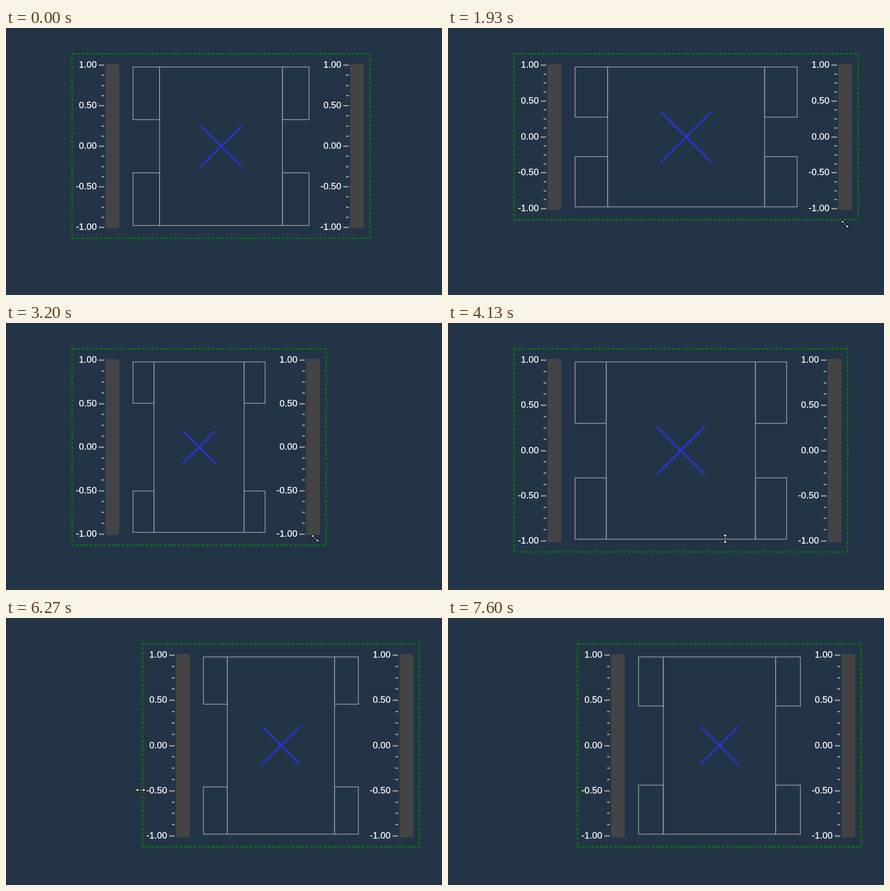
An HTML page with a canvas for the animation above (8.14 s loop, 954x586 px).

```html
<!DOCTYPE html>
<html lang="en">
<head>
<meta charset="utf-8">
<title>Resizing a drive widget</title>
<style>
  html, body { margin: 0; width: 100%; height: 100%; overflow: hidden; background: #243447; }
  canvas { display: block; }
</style>
</head>
<body>
<canvas id="stage" width="954" height="586"></canvas>
<script>
const ctx = document.getElementById('stage').getContext('2d', { alpha: false });
const LOOP = 8140, STEP = 1000 / 15, TOP = 55;

// Drags of the lower right corner and of the left edge: [step, x, y]
const corner = [
  [21, 828, 455], [26, 862, 395], [30, 908, 440], [33, 908, 523], [36, 635, 431],
  [41, 740, 310], [44, 890, 450], [46, 790, 557], [48, 702, 489], [54, 865, 385], [58, 876, 504]];
const side = [
  [81, 150, 304], [84, 430, 325], [89, 165, 360], [94, 297, 377],
  [99, 160, 370], [103, 450, 361], [106, 282, 359]];

// Smooth curve through the points, held at both ends
function along(keys, s) {
  const last = keys.length - 1;
  if (s >= keys[last][0]) return keys[last].slice(1);
  const i = keys.findIndex(k => k[0] > s) - 1;
  const a = keys[i], b = keys[i + 1], p = keys[Math.max(0, i - 1)], n = keys[Math.min(last, i + 2)];
  const d = b[0] - a[0], u = (s - a[0]) / d;
  return [1, 2].map(c => {
    const m0 = (b[c] - p[c]) / (b[0] - p[0]) * d, m1 = (n[c] - a[c]) / (n[0] - a[0]) * d;
    return a[c] * (1 + 2 * u) * (1 - u) ** 2 + m0 * u * (1 - u) ** 2
         + b[c] * u * u * (3 - 2 * u) - m1 * u * u * (1 - u);
  });
}

// Free pointer move that slows down; u runs from 0 to 1
function glide(u, from, to) {
  const e = u * (1.5 - u / 2);
  return from.map((v, i) => v + (to[i] - v) * e);
}

// The pointer runs slightly ahead of the edge it drags
function ahead(keys, s, dx, dy) {
  const a = along(keys, s), b = along(keys, s + 1), offset = [dx, dy];
  return a.map((v, i) => v + (b[i] - v) * 0.6 + offset[i]);
}

function boxAt(s) {
  if (s < 21) return [143, 798, 463];
  if (s < 81) return [143, ...along(corner, s).map(Math.round)];
  return [Math.round(along(side, s)[0]), 906, 504];
}

function pointerAt(s) {
  if (s < 2 || s >= 114) return null;
  if (s < 15) return ['arrow', ...glide((s - 2) / 12, [941, 578], [796, 460])];
  if (s < 21) return ['diagonal', 796, 458];
  if (s < 62) return ['diagonal', ...ahead(corner, s, -36, -3)];
  if (s < 81) {
    const u = Math.min(1, (s - 62) / 10);
    const kind = u === 0 ? 'vertical' : u < 1 ? 'arrow' : 'horizontal';
    return [kind, ...glide(u, [606, 473], [150, 303])];
  }
  if (s < 109) return ['horizontal', ...ahead(side, s, 7, 0)];
  return ['arrow', ...glide((s - 109) / 4, [280, 373], [118, 568])];
}

function drawFrame(l, r, b) {
  ctx.strokeStyle = '#008000';
  ctx.lineWidth = 3;
  ctx.setLineDash([6, 4.2]);
  ctx.strokeRect(l + 1.5, TOP + 1.5, r - l - 3, b - TOP - 3);
  ctx.setLineDash([]);
}

function drawGauge(x, b) {
  const first = TOP + 26.5, gap = (b - 25.5 - first) / 16;
  ctx.font = '20px "Liberation Sans", Arial, sans-serif';
  ctx.textAlign = 'right';
  ctx.strokeStyle = '#fff';
  ctx.lineWidth = 0.3;
  for (let i = 0; i <= 16; i++) {
    const y = Math.round(first + i * gap - 1.5), major = i % 4 === 0;
    ctx.fillStyle = '#969696';
    ctx.fillRect(x - (major ? 15 : 9), y, major ? 12 : 6, 3);
    if (!major) continue;
    const label = (1 - i / 8).toFixed(2);
    ctx.fillStyle = '#fff';
    ctx.fillText(label, x - 19.5, y + 7);
    ctx.strokeText(label, x - 19.5, y + 7);
  }
  ctx.fillStyle = '#444';
  ctx.beginPath();
  ctx.roundRect(x, TOP + 24, 30, b - TOP - 47, 4);
  ctx.fill();
}

function drawBase(l, r, b) {
  const x0 = l + 135, x1 = r - 135, y0 = TOP + 30.5, y1 = b - 29.5;
  const span = r - l - 207, w = 0.13 * span;
  const h = Math.min(0.26 * (span - 3), 0.3 * (y1 - y0 + 60));
  ctx.strokeStyle = '#a6a8ab';
  ctx.lineWidth = 1.5;
  ctx.strokeRect(x0 + w, y0, x1 - x0 - 2 * w, y1 - y0);
  for (const x of [x0, x1 - w])
    for (const y of [y0, y1 - h]) ctx.strokeRect(x, y, w, h);

  const cx = (x0 + x1) / 2, cy = (y0 + y1) / 2, k = span / 10;
  ctx.strokeStyle = '#3030ff';
  ctx.lineWidth = 3;
  ctx.beginPath();
  for (const d of [k, -k]) {
    ctx.moveTo(cx - k, cy - d);
    ctx.lineTo(cx + k, cy + d);
  }
  ctx.stroke();
}

const arrow = new Path2D('M0 0V16L4 12.5 6.5 18.5 9 17.5 6.5 11.5H11.5Z');
const doubleArrow = new Path2D('M-5.5-1V-4.5L-10.5 0-5.5 4.5V1H5.5V4.5L10.5 0 5.5-4.5V-1Z');
const turns = { arrow: 0, horizontal: 0, diagonal: Math.PI / 4, vertical: Math.PI / 2 };

function drawPointer(kind, x, y) {
  const shape = kind === 'arrow' ? arrow : doubleArrow;
  ctx.save();
  ctx.translate(Math.round(x) + 0.5, Math.round(y) + 0.5);
  ctx.rotate(turns[kind]);
  ctx.fillStyle = '#fff';
  ctx.strokeStyle = '#000';
  ctx.lineWidth = 1;
  ctx.fill(shape);
  ctx.stroke(shape);
  ctx.restore();
}

function draw(now) {
  const s = Math.floor(now % LOOP / STEP + 0.06);
  const [l, r, b] = boxAt(s), pointer = pointerAt(s);
  ctx.fillStyle = '#243447';
  ctx.fillRect(0, 0, 954, 586);
  drawGauge(l + 75, b);
  drawGauge(r - 45, b);
  drawBase(l, r, b);
  drawFrame(l, r, b);
  if (pointer) drawPointer(...pointer);
}

let start;
function loop(now) {
  start ??= now;
  draw(now - start);
  requestAnimationFrame(loop);
}
draw(0);
requestAnimationFrame(loop);
</script>
</body>
</html>
```
